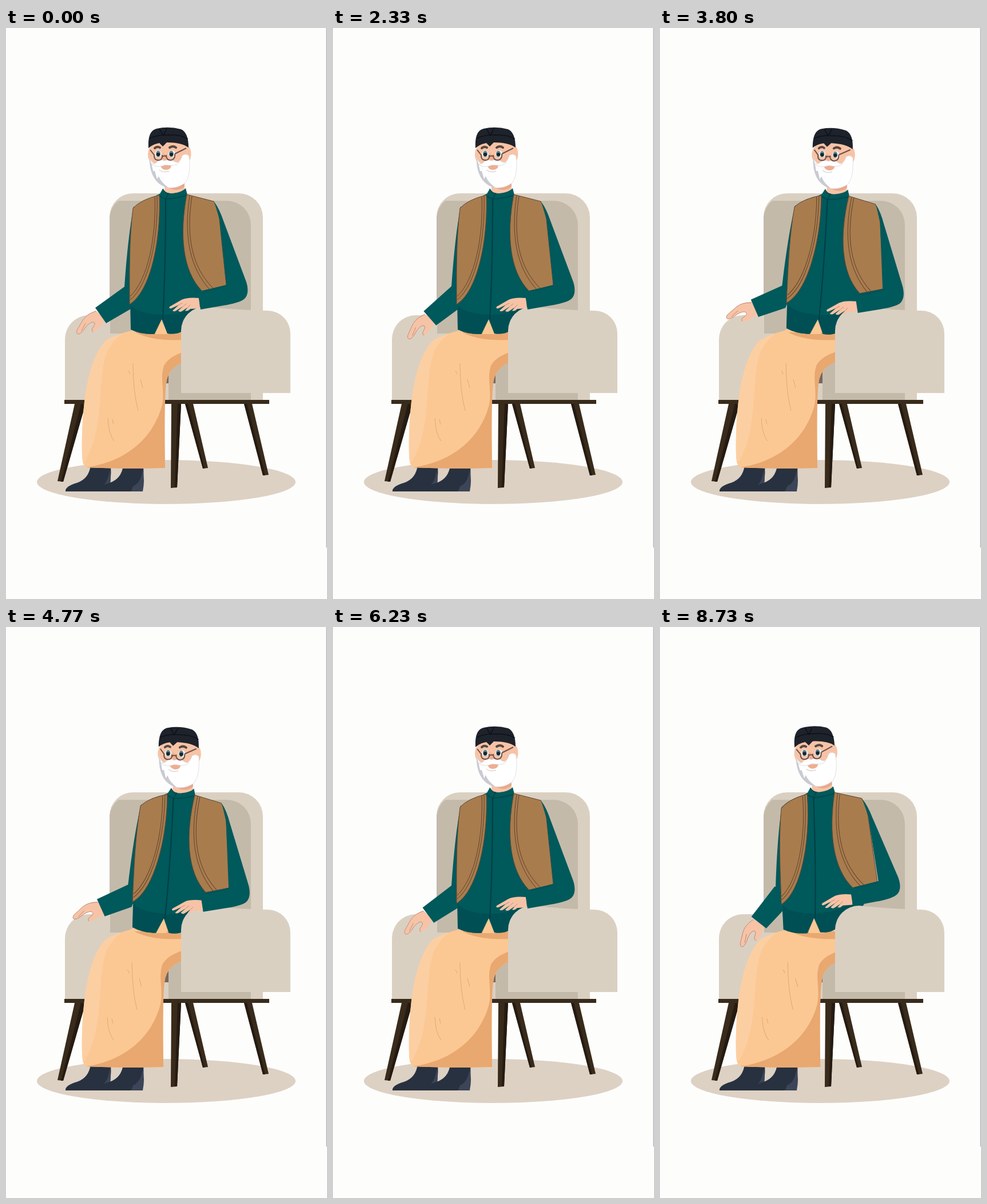
These frames come from a looping animation (561 by 998 pixels, 8.76 s). An HTML page:

```html
<!DOCTYPE html>
<html lang="en">
<head>
<meta charset="utf-8">
<title>Man in an armchair</title>
<style>
  html, body { margin: 0; width: 100%; height: 100%; overflow: hidden; background: #fdfdfc; }
  svg { display: block; width: 100vw; height: 100vh; }
  .chair { fill: #dad0c2; }
  .chair-dark { fill: #c4baaa; }
  .wood { fill: #392b1b; }
  .teal { fill: #00595b; }
  .teal-dark { fill: #004b50; }
  .vest { fill: #a97c4e; stroke: #5f4a35; stroke-width: 1; }
  .stitch { fill: none; stroke: #5f432c; stroke-width: 1; }
  .skin { fill: #f7c3a6; }
  .finger { fill: none; stroke: #b98070; stroke-width: .8; stroke-linecap: round; }
  .fold { fill: none; stroke: #e3a873; stroke-width: 1; }
  .boot { fill: #28313f; }
  .heel { fill: #3c4557; }
  .cap { fill: #1e222b; }
  .frame { fill: none; stroke: #6e5049; stroke-width: 2; }
  .brow { fill: none; stroke: #594842; stroke-width: 4; stroke-linecap: round; }
</style>
</head>
<body>
<svg viewBox="0 0 561 998" preserveAspectRatio="none">
  <rect width="561" height="998" fill="#fdfdfc"/>
  <path d="M560.3 0V908" stroke="#b4b4c0" stroke-width="1.4"/>
  <ellipse cx="280" cy="793.5" rx="226" ry="38.5" fill="#ddd1c4"/>

  <g id="chair">
    <path class="chair" d="M181 650V330A41 41 0 0 1 222 289H407A42 42 0 0 1 449 331V650Z"/>
    <path class="chair-dark" d="M181 650V330Q183 313 196 302H386A42 42 0 0 1 428 344V650Z"/>
    <path class="chair" d="M103 650V544A42 42 0 0 1 145 502H182V534H284V650Z"/>
    <path d="M277 592H284V621H277Z" fill="#76685f"/>
    <path class="wood" d="M102 650H460V657H102ZM120 657H139L100 793L90 792ZM289 657H306L299 803L288 804ZM313 657H327L353 769L344 770ZM416 657H430L459 781L449 782Z"/>
    <path d="M131 657H139L100 793H96ZM300 657H306L299 803H295ZM313 657H318L347 770H344ZM416 657H421L453 782H449Z" fill="#251b12"/>
  </g>

  <g id="boots">
    <path class="boot" id="boot" d="M104 810Q103 801 124 795Q145 788 148 764H183Q185 790 178 808L160 810Z"/>
    <path class="heel" d="M181 772Q185 790 180 810H160L164 803Q179 797 181 772Z"/>
    <use href="#boot" x="57"/>
    <path class="heel" d="M239 772Q243 790 239 810H219L222 801Q236 795 239 772Z"/>
  </g>

  <g id="skirt">
    <path d="M176 545Q198 534 219 529L262 503H285L325 529V580Q283 588 280 621Q276 650 278 769Q200 771 140 768Q133 764 133 745C132 670 140 580 176 545Z" fill="#fbc894"/>
    <path d="M176 545Q190 538 204 534Q176 552 170 590C161 650 168 705 138 758Q133 760 133 745C132 670 140 580 176 545Z" fill="#fccfa2"/>
    <path d="M325 562Q286 571 276 590C268 615 279 635 272 662C258 712 215 757 140 768Q200 771 278 769Q276 650 280 621Q283 588 325 580Z" fill="#e8a870"/>
    <path d="M226 532H325V544Q260 550 226 532Z" fill="#e8a870"/>
    <path d="M258 535L262 503H285L284 535Z" fill="#fbc894"/>
    <path class="fold" d="M222 586Q222 635 231 669M235 614L239 629M178 682Q179 709 189 722M186 684L188 693M214 599L217 605"/>
  </g>

  <g id="torsoBack">
    <g id="leftArm">
      <g id="leftHand">
        <path class="skin" d="M157 494C146 498 140 502 134 511L124 528Q122 535 127 535Q133 533 140 522Q148 513 153 514Q158 516 152 523Q148 529 152 531Q160 529 166 520L175 510Z"/>
        <path class="finger" d="M157 495C146 499 140 502 134 511L124 528Q122 535 127 535Q133 533 140 522Q148 513 153 514Q158 516 152 523Q148 529 152 531M132 529L139 516"/>
      </g>
      <path class="teal" d="M210 450L156 489L175 516L218 491L224 462Z"/>
    </g>
    <path class="teal" d="M223 312Q213 365 207 452Q207 468 217 478L235 440V320Z"/>
  </g>

  <g id="torso">
    <path class="teal" d="M268 290L222 315L217 480L218 527Q236 536 259 535L272 509L282 534Q298 536 308 530L352 500L385 452L373 325L363 303L316 291Z"/>
    <path class="teal-dark" d="M218 484Q230 500 273 501V507L260 535Q236 536 218 527ZM278 501Q320 500 338 480L352 500L308 530Q298 536 282 534L273 508Z" opacity=".65"/>
    <path d="M279 297Q279 420 274 510" fill="none" stroke="#003e45" stroke-width="2"/>
    <path class="skin" d="M277 268H312V288L294 293L277 288Z"/>
    <path d="M285 280Q303 281 312 270V277Q300 287 285 280Z" fill="#e7a98c"/>
    <path class="teal" d="M274 281Q279 290 291 289Q308 287 314 280L317 292Q295 298 279 299L267 293Z"/>
    <path d="M267 293L279 299Q298 298 317 292M274 281Q279 290 284 289L279 299" fill="none" stroke="#003e45" stroke-width="1.2"/>
    <path class="vest" d="M268 292Q235 300 222 315C215 370 216 430 216 483C253 460 271 370 268 292Z"/>
    <path class="stitch" d="M264 294C266 365 251 448 217 475M260 295C263 365 248 440 217 469"/>
    <path class="vest" d="M316 291L363 303Q370 315 373 334L385 450L343 460C308 425 303 360 316 291Z"/>
    <path class="stitch" d="M321 293C310 365 322 420 356 457M325 294C314 365 325 418 362 455"/>

    <g id="head">
      <ellipse class="skin" cx="253" cy="221" rx="5" ry="12"/>
      <ellipse class="skin" cx="318" cy="220" rx="5.5" ry="13"/>
      <path class="skin" d="M252 200H318V245Q300 270 275 260Q252 250 252 225Z"/>
      <path d="M251 226Q254 236 262 238L298 236Q305 234 308 223Q315 218 320 224C322 245 321 260 313 271Q298 281 283 279C263 274 250 255 251 226Z" fill="#fff" stroke="#d5d5dc" stroke-width=".7"/>
      <path d="M251 227C251 258 264 276 284 279Q270 269 267 259L264 264L260 250L257 250Q254 235 251 227Z" fill="#c9cad2"/>
      <path d="M270 240H289Q288 248 279 248Q271 247 270 240Z" fill="#efae90"/>
      <path d="M268 248Q275 254 285 250" fill="none" stroke="#c8c9cf" stroke-width="1"/>
      <path d="M275 218Q271 231 278 231Q282 231 282 227" fill="#efae90"/>
      <path d="M254 238Q261 238 265 233Q271 229 277 232Q287 228 292 232Q297 236 303 235Q297 243 279 239Q264 246 254 238Z" fill="#fff" stroke="#d2d2d4" stroke-width=".7"/>
      <path class="brow" d="M260 210Q264 206 269 209M286 209Q292 205 297 209"/>
      <ellipse cx="266" cy="220" rx="5.5" ry="6" fill="#fff"/>
      <ellipse cx="290" cy="220" rx="6" ry="6" fill="#fff"/>
      <ellipse cx="266" cy="220" rx="4" ry="5.5" fill="#5a8790"/>
      <ellipse cx="289" cy="220" rx="4" ry="5.5" fill="#5a8790"/>
      <circle cx="266" cy="221" r="3" fill="#17222c"/>
      <circle cx="289" cy="221" r="3" fill="#17222c"/>
      <path class="frame" d="M259 221Q258 231 266 231Q274 231 273 222M280 222Q280 231 288 231Q296 230 295 220M273 225Q277 222 281 225M295 220L315 210M259 222L252 213"/>
      <path class="cap" d="M249 210C248 190 252 179 263 176Q284 171 306 177Q319 183 319 209Q307 200 281 200L274 207L268 201Q256 203 249 210Z"/>
      <path d="M251 193Q265 186 285 187Q305 186 318 194M268 176L275 188L281 176" fill="none" stroke="#0b0e14" stroke-width="1.3"/>
    </g>
  </g>

  <path class="chair" d="M306 638V529A42 42 0 0 1 348 487Q405 493 457 494A40 40 0 0 1 497 534V638Z"/>

  <g id="torsoFront">
    <path class="teal" id="upperArm" d="M364 304Q373 316 380 337L420 444Q426 464 417 473Q408 481 383 483L385 449L373 334Z"/>
    <g id="rightArm">
      <path class="skin" d="M338 472Q317 470 307 475L286 487Q284 491 289 490L302 484L291 494Q294 497 299 493L310 486L301 494Q304 498 309 494L318 488L313 494Q317 496 322 491L339 490Z"/>
      <path class="finger" d="M302 484L308 481M310 486L315 482M318 488L322 484"/>
      <path class="teal" d="M335 461L385 449L410 450Q422 462 415 473Q406 481 380 485L340 492Z"/>
      <path d="M343 460Q362 458 385 450" fill="none" stroke="#004b50" stroke-width="1"/>
    </g>
  </g>
</svg>
<script>
  const LOOP = 8760, CYCLE = 3300;
  const byId = id => document.getElementById(id);
  const move = (id, value) => byId(id).setAttribute('transform', value);

  // Each key is [ms within the cycle, value]; cosine easing in between.
  const LEAN = [[0, 0], [30, 0], [270, 1.35], [480, 1], [1800, 1], [2115, -.8], [2265, 0], [3300, 0]];
  const ARM = [[0, 0], [30, 0], [290, 12], [600, 8], [1790, 8], [2125, -14.5], [2270, -6.5], [2600, -1.5], [3030, -1.5], [3300, 0]];
  const DRIFT = [[0, 0], [270, 0], [570, 3], [1170, 0], [1470, 1.5], [1800, 0], [3300, 0]];

  function sample(keys, t) {
    const i = keys.findIndex(key => key[0] > t);
    const [t0, a] = keys[i - 1], [t1, b] = keys[i];
    return a + (b - a) * (1 - Math.cos(Math.PI * (t - t0) / (t1 - t0))) / 2;
  }

  function draw(time) {
    const t = time % LOOP % CYCLE;
    const lean = sample(LEAN, t), arm = sample(ARM, t), drift = sample(DRIFT, t);
    const body = `translate(${2.5 * lean} 0) rotate(${2.7 * lean} 265 535)`;
    for (const id of ['torsoBack', 'torso', 'torsoFront']) move(id, body);
    move('leftArm', `rotate(${arm} 213 469)`);
    move('leftHand', `rotate(${Math.max(0, arm) * .75} 166 503)`);
    move('upperArm', `rotate(${lean} 370 312)`);
    move('rightArm', `translate(${drift - 2.2 * lean} 0) rotate(${-2 * lean} 405 466)`);
    move('skirt', `translate(133 0) scale(${1 - .02 * lean} 1) translate(-133 0)`);
  }

  function tick() {
    draw(performance.now());
    requestAnimationFrame(tick);
  }
  tick();
</script>
</body>
</html>
```
